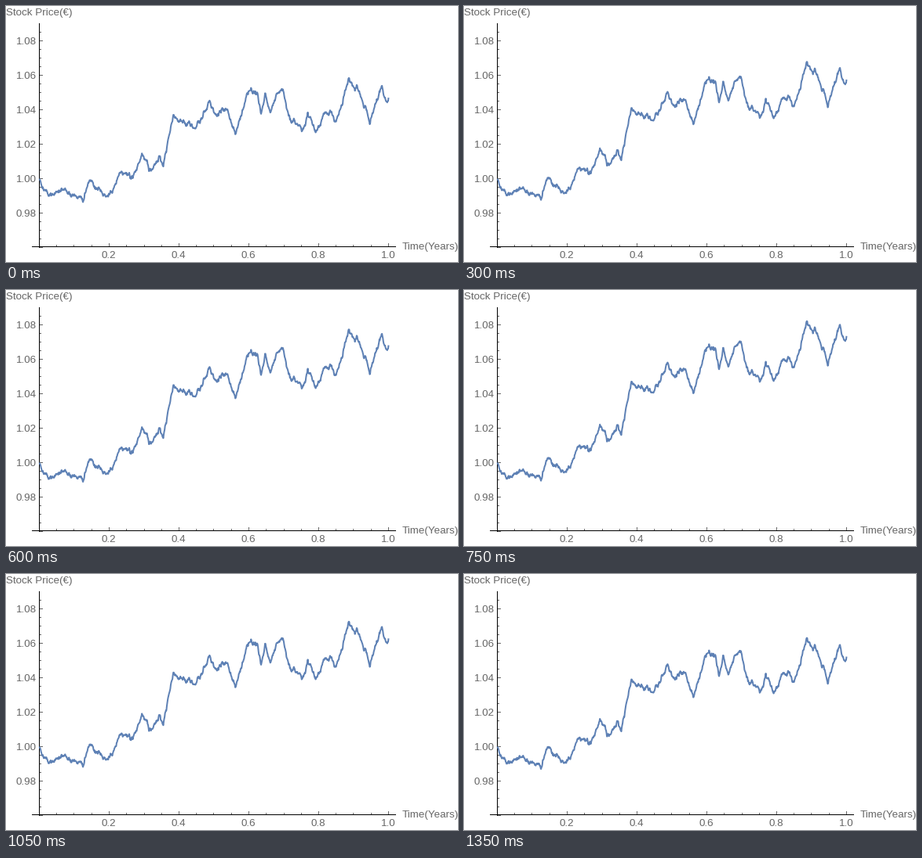
These frames come from a looping animation (576x327 px, 1500 ms). A matplotlib script:

```python
import numpy as np
import matplotlib.pyplot as plt
from matplotlib.animation import FuncAnimation

W, H, DPI = 576, 327, 100
PT = 72 / DPI                      # points per pixel
BLUE, GRAY = "#5e81b5", "#666666"
FRAMES = 10
DRIFT = 0.005                      # drift added per step

plt.rcParams["font.family"] = "Liberation Sans"
plt.rcParams["path.simplify"] = False
fig = plt.figure(figsize=(W / DPI, H / DPI), dpi=DPI, facecolor="white")
ax = fig.add_axes([0, 0, 1, 1])
ax.set_xlim(0, W)
ax.set_ylim(H, 0)
ax.axis("off")


def px(t):
    return 42.5 + 445 * t


def py(price):
    return 220.5 - 2200 * (price - 1)


def line(xs, ys, color):
    ax.plot(xs, ys, color=color, lw=PT, snap=False, solid_capstyle="butt")


def label(x, y, s, ha="left"):
    ax.text(x, y, s, ha=ha, va="baseline", color=GRAY, fontsize=13.4 * PT)


def draw_axes():
    for i in range(1, 21):
        x = round(445 * i / 20) + 42.5
        major = i % 4 == 0
        line([x, x], [307.5, 303 if major else 305], GRAY)
        if major:
            label(x - 0.5, 322, f"{i / 20:.1f}", "center")
    for i in range(26):
        price = 0.96 + 0.005 * i
        major = i % 4 == 0
        line([42.5, 47 if major else 45], [py(price)] * 2, GRAY)
        if major and i:
            label(39, py(price) + 4.5, f"{price:.2f}", "right")
    line([33, 497], [307.5, 307.5], "black")
    line([42.5, 42.5], [22, 309], "black")
    label(0, 12, "Stock Price(€)")
    label(505, 311.5, "Time(Years)")


def make_walk(n=800, keep=0.82, vol=0.0007):
    """Main swings of the price plus mean-reverting seeded noise."""
    swings = [
        (0, 1), (.013, .9935), (.07, .993), (.124, .988), (.145, 1),
        (.19, .99), (.21, .994), (.23, 1.004), (.262, .9995),
        (.292, 1.0145), (.324, 1.006), (.344, 1.0125), (.355, 1.008),
        (.384, 1.036), (.447, 1.029), (.488, 1.045), (.506, 1.037),
        (.539, 1.041), (.562, 1.026), (.596, 1.052), (.625, 1.051),
        (.634, 1.039), (.647, 1.049), (.661, 1.039), (.679, 1.051),
        (.697, 1.053), (.712, 1.037), (.753, 1.028), (.769, 1.039),
        (.791, 1.025), (.818, 1.039), (.85, 1.034), (.886, 1.0555),
        (.917, 1.052), (.946, 1.032), (.982, 1.055), (.991, 1.046),
        (1, 1.047)]
    rng = np.random.default_rng(7)
    noise = np.zeros(n + 1)
    for i in range(1, n):
        noise[i] = keep * noise[i - 1] + rng.normal(0, vol)
    t = np.linspace(0, 1, n + 1)
    return t, np.interp(t, *zip(*swings)) + noise


draw_axes()
t, base = make_walk()
curve, = ax.plot([], [], color=BLUE, lw=2 * PT, solid_joinstyle="round",
                 solid_capstyle="butt", zorder=5)


def update(i):
    k = min(i, FRAMES - i)
    curve.set_data(px(t), py(base * np.exp(DRIFT * k * t)))
    return curve,


anim = FuncAnimation(fig, update, frames=FRAMES, interval=150,
                     init_func=lambda: update(0), repeat=True, repeat_delay=0)
plt.show()
```
